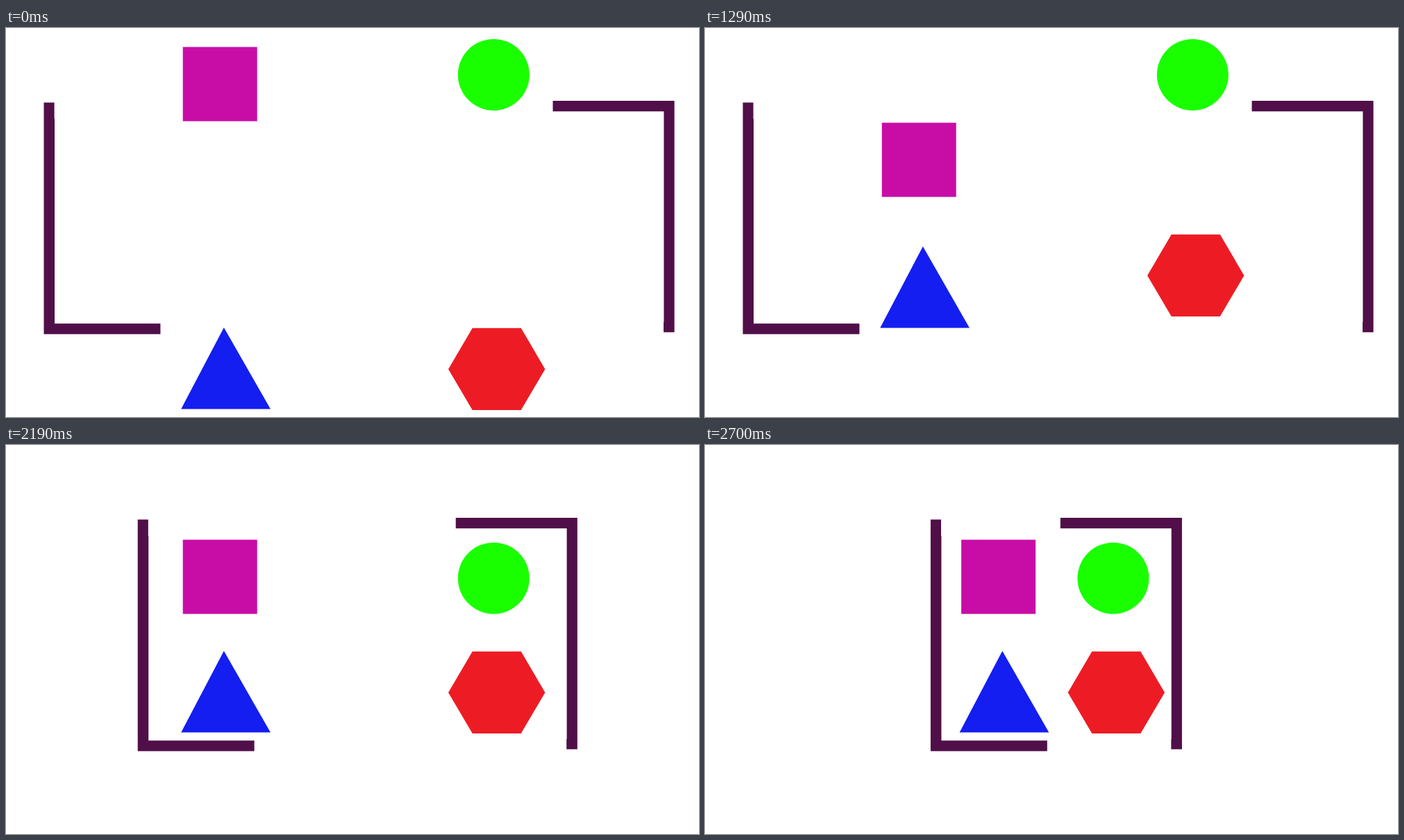
An HTML page for the animation above (3.23 s loop, 998x561 px).

```html
<!DOCTYPE html>
<html>
<head>
<meta charset="utf-8">
<title>Shapes</title>
<style>
html, body { margin: 0; width: 100%; height: 100%; overflow: hidden; background: #fff; }
svg { display: block; width: 100%; height: 100%; }
</style>
</head>
<body>
<svg viewBox="0 0 998 561">
  <path id="left" fill="#500f48" d="M54.5 107.6H69.6V131H70V426.3H222.4V441.4H54.5Z"/>
  <path id="right" fill="#500f48" d="M787.5 105H962.6V438.8H947V424H947.4V120.2H787.5Z"/>
  <rect id="square" fill="#c80da7" x="254.7" y="27.4" width="107" height="107"/>
  <path id="triangle" fill="#141ef0" d="M313.8 432L380.9 549.4H252.2Z"/>
  <circle id="circle" fill="#1aff00" cx="702.3" cy="67.4" r="51.5"/>
  <path id="hexagon" fill="#ed1c24" d="M637 492L671.7 432.7H741.7L776.4 492L741.7 551H671.7Z"/>
</svg>
<script>
const LOOP = 3230, STEP = 30, MOVE = 450;

// Each move is linear and lasts MOVE ms: [id, start, dx, dy]
const moves = [
  ['square', 0, 0, 109.2],
  ['hexagon', 450, 0, -135],
  ['triangle', 900, 0, -135],
  ['circle', 1350, 0, 124.8],
  ['left', 1800, 156, 0],
  ['right', 1800, -161.3, 0],
  ['left', 2250, 114.4, 0],
  ['square', 2250, 114.4, 0],
  ['triangle', 2250, 114.4, 0],
  ['right', 2250, -114.4, 0],
  ['circle', 2250, -114.4, 0],
  ['hexagon', 2250, -114.4, 0]
];

function draw(ms) {
  const t = Math.floor((ms % LOOP) / STEP) * STEP;
  const pos = {};
  for (const [id, start, dx, dy] of moves) {
    const k = Math.min(1, Math.max(0, (t - start) / MOVE));
    const p = pos[id] || (pos[id] = [0, 0]);
    p[0] += dx * k;
    p[1] += dy * k;
  }
  for (const id in pos) {
    document.getElementById(id).setAttribute('transform', `translate(${pos[id]})`);
  }
}

let origin = null;
function tick(now) {
  if (origin === null) origin = now;
  draw(now - origin);
  requestAnimationFrame(tick);
}
draw(0);
requestAnimationFrame(tick);
</script>
</body>
</html>
```
